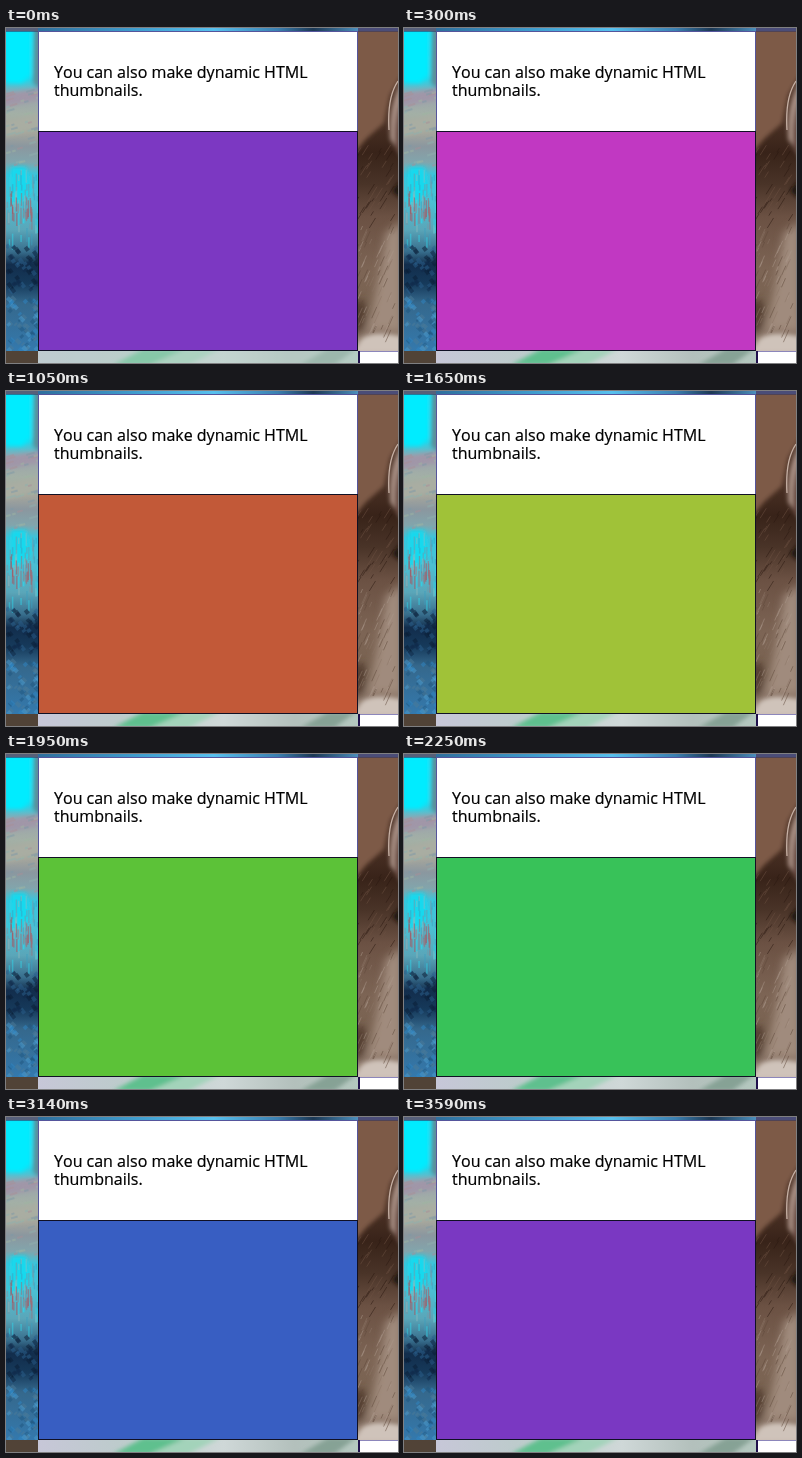
Write an HTML page that moves like this. It is 392 px wide and 335 px high and loops after 3.69 s.

```html
<!DOCTYPE html>
<html lang="en">
<head>
<meta charset="utf-8">
<title>Dynamic thumbnail</title>
<style>
  html, body { margin: 0; width: 100%; height: 100%; overflow: hidden; background: #fff; }
  svg { display: block; }
  text { font: 16px "Open Sans", sans-serif; font-kerning: none; stroke: #000; stroke-width: .2px; }
</style>
</head>
<body>
<svg width="392" height="335" viewBox="0 0 392 335">
  <defs>
    <linearGradient id="paint" x2="0" y2="1">
      <stop offset="0" stop-color="#08e2fa"/><stop offset=".15" stop-color="#22d5ea"/>
      <stop offset=".2" stop-color="#9aa3ac"/><stop offset=".26" stop-color="#a3b0a6"/>
      <stop offset=".32" stop-color="#a4a59c"/><stop offset=".36" stop-color="#8b979f"/>
      <stop offset=".41" stop-color="#82a5ac"/><stop offset=".45" stop-color="#38c6dd"/>
      <stop offset=".53" stop-color="#4bc0d4"/><stop offset=".62" stop-color="#5aa6b9"/>
      <stop offset=".69" stop-color="#376d8c"/><stop offset=".73" stop-color="#122d4c"/>
      <stop offset=".79" stop-color="#163a5b"/><stop offset=".85" stop-color="#35688c"/>
      <stop offset="1" stop-color="#3479ad"/>
    </linearGradient>
    <linearGradient id="fur" x2="0" y2="1">
      <stop offset=".28" stop-color="#4b3125"/><stop offset=".38" stop-color="#382319"/>
      <stop offset=".48" stop-color="#4a3428"/><stop offset=".58" stop-color="#6b5143"/>
      <stop offset=".75" stop-color="#7d6555"/><stop offset=".88" stop-color="#77614f"/>
      <stop offset=".94" stop-color="#8a7567"/><stop offset="1" stop-color="#b5a69a"/>
    </linearGradient>
    <linearGradient id="top">
      <stop offset="0" stop-color="#2f6f9d"/><stop offset=".3" stop-color="#3f9ccd"/>
      <stop offset=".55" stop-color="#57c0ee"/><stop offset=".75" stop-color="#3b7fb0"/>
      <stop offset=".86" stop-color="#1c3854"/><stop offset="1" stop-color="#4c8fbd"/>
    </linearGradient>
    <linearGradient id="mist">
      <stop offset="0" stop-color="#c7c7d8"/><stop offset=".25" stop-color="#bdcbcc"/>
      <stop offset=".58" stop-color="#cfd8d8"/><stop offset=".8" stop-color="#b3c0bc"/>
      <stop offset="1" stop-color="#b4c8bf"/>
    </linearGradient>
    <filter id="soft" x="-50%" y="-50%" width="200%" height="200%"><feGaussianBlur stdDeviation="2"/></filter>
    <filter id="softer" x="-50%" y="-50%" width="200%" height="200%"><feGaussianBlur stdDeviation="4"/></filter>
  </defs>

  <!-- neighbouring pictures above and below -->
  <rect width="32" height="3" fill="#57607a"/>
  <rect x="32" width="320" height="3" fill="url(#top)"/>
  <rect x="352" width="40" height="3" fill="#4b4d78"/>
  <rect y="323" width="32" height="12" fill="#514337"/>
  <svg x="32" y="323" width="320" height="12">
    <rect width="320" height="12" fill="url(#mist)"/>
    <g filter="url(#soft)">
      <path d="M75 14L105 -2H148L112 14Z" fill="#5fc08e"/>
      <path d="M112 14L148 -2H182L150 14Z" fill="#a3d3ba"/>
      <path d="M262 14L290 -2H318L296 14Z" fill="#86a295"/>
    </g>
    <rect id="haze" width="320" height="12" fill="#b6d0c8" opacity=".45"/>
  </svg>
  <path d="M354 323.5H392" stroke="#8c86bb"/>
  <rect x="352" y="323" width="2" height="12" fill="#20104c"/>

  <!-- left picture -->
  <svg y="3" width="32" height="320">
    <rect width="32" height="320" fill="url(#paint)"/>
    <g filter="url(#soft)">
      <path d="M0 0H25V44L16 52H0Z" fill="#00ecff"/>
      <path d="M28 -4H36V60L27 52Z" fill="#5f8d97"/>
      <path d="M-4 64L36 57V68L-4 76Z" fill="#a096a8"/>
      <path d="M-4 92L36 82V96L-4 106Z" fill="#a9ada2"/>
      <path d="M5 136H20L26 160L14 172H4Z" fill="#17d9ee"/>
    </g>
    <g id="strokes"></g>
  </svg>

  <!-- right picture -->
  <svg x="352" y="3" width="40" height="320">
    <rect width="40" height="320" fill="url(#fur)"/>
    <g filter="url(#soft)">
      <path d="M-5 -5H45V42L32 64L26 92L8 108L-5 124Z" fill="#7d5a46"/>
      <path d="M44 50Q30 72 32 108L44 126Z" fill="#a68d82"/>
      <path d="M44 68Q36 84 37 118L44 122Z" fill="#68493f"/>
      <path d="M44 148L34 160L44 168Z" fill="#1d120d"/>
    </g>
    <g filter="url(#softer)">
      <path d="M44 190L28 202L22 240L14 280L10 300H44Z" fill="#a08b7d"/>
      <path d="M-4 268L8 272L6 296L-4 306Z" fill="#4d382c"/>
    </g>
    <path d="M-4 322L4 308Q16 299 44 306V322Z" fill="#cfc3ba" filter="url(#soft)"/>
    <path d="M40 50Q29 66 31 99" fill="none" stroke="#c7b1a5" stroke-width="1.3"/>
    <g id="hairs"></g>
  </svg>

  <!-- thumbnail card -->
  <path d="M0 3.5H32M352 3.5H392" stroke="#33345f" opacity=".6"/>
  <rect x="32.5" y="3.5" width="319" height="319" fill="#fff" stroke="#55559c"/>
  <text x="48" y="50">You can also make dynamic HTML</text>
  <text x="48" y="68">thumbnails.</text>
  <rect id="swatch" x="32.5" y="103.5" width="319" height="219" stroke="#101024"/>
</svg>
<script>
  const LOOP = 3690, STEP = 150, SHIFT = 2840;
  const byId = id => document.getElementById(id);
  const swatch = byId('swatch'), haze = byId('haze');

  let seed = 17;
  const random = () => (seed = seed * 16807 % 2147483647) / 2147483647;

  // Scatters short strokes over a band of a picture.
  function scatter(id, count, [left, right], [top, bottom], [dx, dy], width, colors) {
    let markup = '';
    for (let i = 0; i < count; i++) {
      const x = left + random() * (right - left);
      const y = top + random() * (bottom - top);
      const size = .4 + random();
      markup += `<path d="M${x} ${y}l${dx * size} ${dy * size}" stroke="${colors[i % colors.length]}"
        stroke-width="${width}" opacity=".5"/>`;
    }
    byId(id).innerHTML += markup;
  }

  scatter('strokes', 40, [-4, 32], [60, 135], [7, -2], 2, ['#8fb0ae', '#a88f98', '#9fb5a2', '#7f99a6']);
  scatter('strokes', 50, [0, 32], [138, 210], [0, 13], 1.5, ['#2fd6ea', '#7895a5', '#3c9fc0', '#8fb9bd']);
  scatter('strokes', 22, [0, 26], [160, 182], [0, 13], 1.3, ['#b8434c', '#a8666e']);
  scatter('strokes', 50, [0, 32], [212, 260], [3, 4], 4, ['#0a1c33', '#2a5f8c', '#10294a']);
  scatter('strokes', 60, [0, 32], [264, 318], [3, 3], 4, ['#2f86c4', '#4d7b98', '#1f567f', '#4b9ccf']);
  scatter('hairs', 40, [0, 38], [110, 190], [-5, 8], 1, ['#2a1810', '#6d5142']);
  scatter('hairs', 70, [0, 38], [190, 300], [-4, 9], 1, ['#5f493b', '#ab988b', '#8c7667']);

  const snap = t => Math.floor(t / STEP) * STEP;

  function draw(now) {
    const t = now % LOOP;
    const held = t < SHIFT ? snap(t) : SHIFT + snap(t - SHIFT);
    swatch.setAttribute('fill', `hsl(${269.5 + held / 10}, 55%, 49%)`);
    haze.setAttribute('visibility', t < STEP ? 'visible' : 'hidden');
    requestAnimationFrame(draw);
  }

  draw(performance.now());
</script>
</body>
</html>
```
